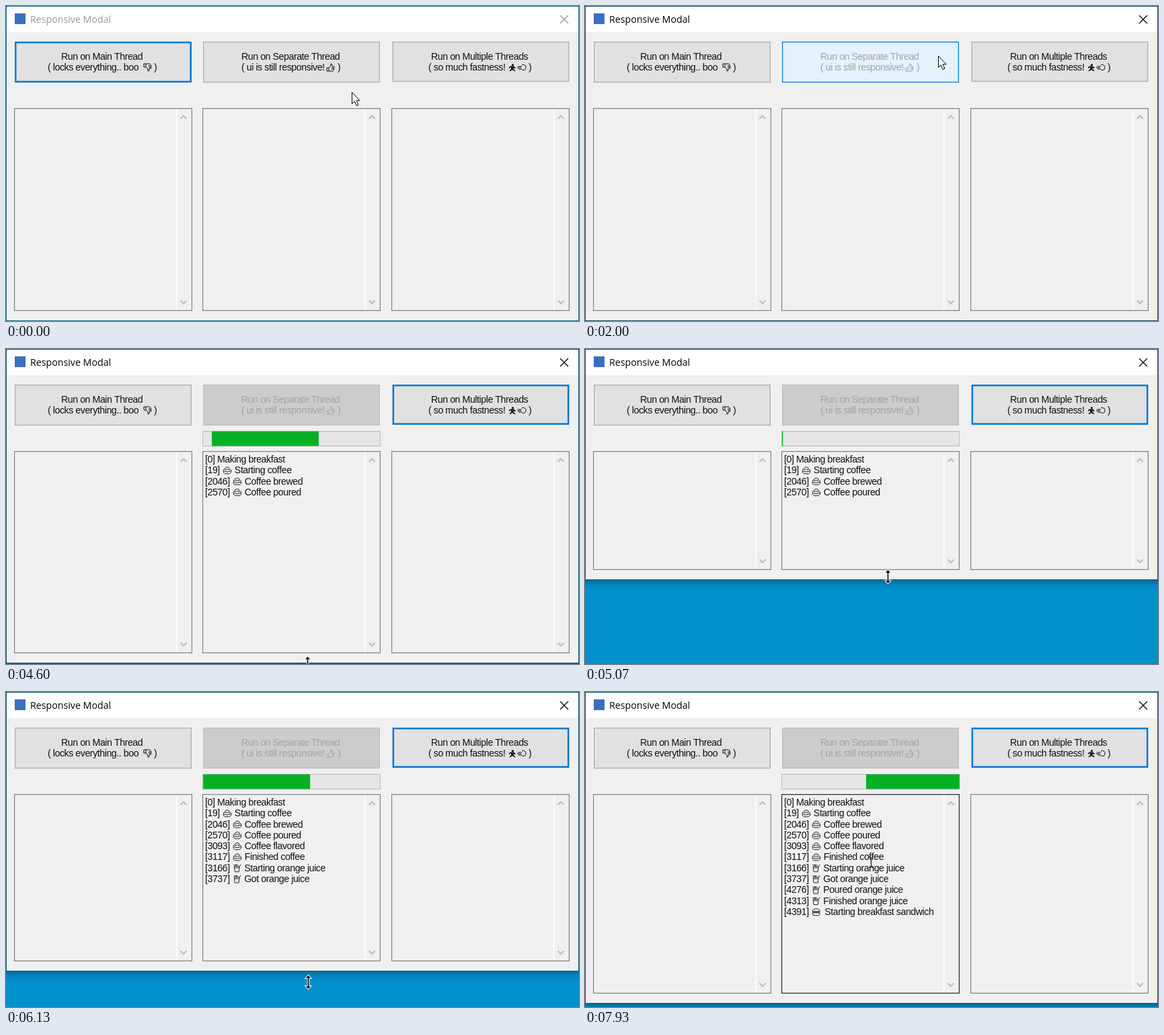
These frames come from a looping animation (852 by 469 pixels, 8000 ms). An HTML page with a canvas:

```html
<!DOCTYPE html>
<html lang="en">
<head>
<meta charset="utf-8">
<title>Responsive Modal</title>
<style>
html, body { margin: 0; width: 100%; height: 100%; overflow: hidden; background: #0391ce; }
canvas { display: block; }
</style>
</head>
<body>
<canvas id="stage" width="852" height="469"></canvas>
<script>
const ctx = document.getElementById('stage').getContext('2d');
const W = 852, H = 469, LOOP = 8000, STEP = 1000 / 15;
const UI_FONT = '14.2px "Liberation Sans", Arial, sans-serif';
const TITLE_FONT = '14.2px "Open Sans", "Noto Sans", sans-serif';

const CLICK = 1866, DISABLED = 1999, LOG_START = 2015;
const DRAG_FROM = 4460, DRAG_TO = 6940;
const BOXES = [12, 292, 573];
const BAR = { x: 293, w: 264, chunk: 159 };
const LAP = BAR.w + BAR.chunk;

// Tracks: [time, value]
const edgeTrack = [[4533, 468], [4600, 467], [5333, 292], [5667, 337], [6133, 415], [6600, 457], [6933, 463]];
const cursorX = [[1133, 514], [1533, 525], [2133, 525], [2667, 506], [3200, 452], [4400, 448], [4600, 448],
  [5667, 453], [6600, 445], [7133, 445], [7933, 425]];
const cursorY = [[1067, 128], [1600, 74], [2133, 74], [2667, 142], [3200, 400], [3533, 420], [4200, 468],
  [4600, 468], [5300, 294], [5667, 359.5], [6133, 432], [6600, 463], [6933, 466], [7133, 466], [7867, 256], [7933, 253]];
const barTrack = [[2067, 134 - LAP], [3200, 418], [4600, 306 + 2 * LAP], [5667, 463 + 3 * LAP],
  [6600, 546 + 4 * LAP], [7933, 418 + 6 * LAP]];

const LOG = [
  [0, '', 'Making breakfast'],
  [19, 'pot', 'Starting coffee'],
  [2046, 'pot', 'Coffee brewed'],
  [2570, 'pot', 'Coffee poured'],
  [3093, 'pot', 'Coffee flavored'],
  [3117, 'pot', 'Finished coffee'],
  [3166, 'cup', 'Starting orange juice'],
  [3737, 'cup', 'Got orange juice'],
  [4276, 'cup', 'Poured orange juice'],
  [4313, 'cup', 'Finished orange juice'],
  [4391, 'bun', 'Starting breakfast sandwich']
];

// Line icons on a 13 x 13 grid
const ICONS = {
  up: 'M1 7H4V12H1ZM4 7L7 4V1Q9 1 9 3V5H11.5Q12.5 6 11.5 7Q12.5 8 11.5 9Q12 10.5 10.5 11Q10.5 12 9 12H4M8 7H11M8 9H11',
  down: 'M1 1H4V6H1ZM4 6L7 9V12Q9 12 9 10V8H11.5Q12.5 7 11.5 6Q12.5 5 11.5 4Q12 2.5 10.5 2Q10.5 1 9 1H4M8 4H11M8 6H11',
  puff: 'M1 5H7M0 7H6M2 9H7M7 3Q9 1 11 3Q14 4 13 7Q13 10 10 10.5Q8 11 7 9',
  pot: 'M1 6.5Q0 10 3 11.5H10Q13.5 10 12.5 6.5Q11.5 4.5 10 4.5Q10 1.5 6.5 1.5Q3.5 1.5 3 4.5Q1 4.5 1 6.5ZM3 6Q6 3.5 10 6M2 8Q6.5 9.5 12 7.5',
  cup: 'M2 4H10L9 12H3ZM1 2H8M10 4L12 1M3 6H9M5 1V4',
  bun: 'M1 6Q1 2 6.5 2Q12 2 12 6ZM1 8H12V10Q11 12 9 12H4Q1 12 1 9ZM1 7H12'
};
const RUNNER = 'M5 1.5H8V4H5ZM3 4.5H8L11 7L10 8L7 7L8 9L11 12H9L6 10L3 12H1L4 9L4 6L1 8V6Z';
const paths = {};
for (const name in ICONS) paths[name] = new Path2D(ICONS[name]);
const runner = new Path2D(RUNNER);
const arrow = new Path2D('M.5 .5V17.5L4.4 13.8L7.2 20.5L9.9 19.3L7.1 12.8H12Z');
const sizer = new Path2D('M.5 -10L4 -6H1.3V6H4L.5 10L-3 6H-.3V-6H-3Z');

const clamp = v => Math.max(0, Math.min(1, v));
const ramp = (t, from, to) => clamp((t - from) / (to - from));

// Smooth curve through the points without overshoot
function track(pts, t) {
  const last = pts.length - 1;
  if (t <= pts[0][0]) return pts[0][1];
  if (t >= pts[last][0]) return pts[last][1];
  let i = 0;
  while (t >= pts[i + 1][0]) i++;
  const slope = k => (pts[k + 1][1] - pts[k][1]) / (pts[k + 1][0] - pts[k][0]);
  const tangent = k => {
    if (k === 0) return slope(0);
    if (k === last) return slope(last - 1);
    const a = slope(k - 1), b = slope(k);
    return a * b <= 0 ? 0 : 2 * a * b / (a + b);
  };
  const [t0, a] = pts[i], [t1, b] = pts[i + 1];
  const d = t1 - t0, u = (t - t0) / d, v = 1 - u;
  return a * (1 + 2 * u) * v * v + b * u * u * (3 - 2 * u) + d * u * v * (tangent(i) * v - tangent(i + 1) * u);
}

function mix(a, b, p) {
  return 'rgb(' + a.map((v, i) => Math.round(v + (b[i] - v) * p)).join(',') + ')';
}

function rect(x, y, w, h, color) {
  ctx.fillStyle = color;
  ctx.fillRect(x, y, w, h);
}

function frame(x, y, w, h, color, line = 1) {
  ctx.strokeStyle = color;
  ctx.lineWidth = line;
  ctx.strokeRect(x + line / 2, y + line / 2, w - line, h - line);
}

function text(str, x, y, color) {
  ctx.font = UI_FONT;
  ctx.letterSpacing = '-0.45px';
  ctx.fillStyle = color;
  ctx.fillText(str, x, y);
  return ctx.measureText(str).width;
}

function polyline(points, color, line) {
  ctx.strokeStyle = color;
  ctx.lineWidth = line;
  ctx.beginPath();
  points.forEach(([x, y]) => ctx.lineTo(x, y));
  ctx.stroke();
}

function icon(name, x, y, color) {
  ctx.save();
  ctx.translate(x, y);
  if (name === 'run') {
    ctx.fillStyle = color;
    ctx.fill(runner);
  } else {
    ctx.strokeStyle = color;
    ctx.lineWidth = 1;
    ctx.stroke(paths[name]);
  }
  ctx.restore();
}

function drawWindow(edge, active) {
  if (edge < H - 1) {
    rect(0, edge, W, H - edge, '#0391ce');
    const shade = ctx.createLinearGradient(0, edge, 0, edge + 16);
    shade.addColorStop(0, 'rgba(0,30,50,.36)');
    shade.addColorStop(.45, 'rgba(0,30,50,.13)');
    shade.addColorStop(1, 'rgba(0,30,50,0)');
    rect(0, edge, W, 16, shade);
  }
  rect(0, 0, W, edge + 1, active ? '#0b506c' : '#1c6f90');
  rect(1, 1, W - 2, 38, '#fff');
  rect(1, 39, W - 2, edge - 39, '#f0f0f0');
  rect(13, 11, 16, 16, '#3c6ebf');

  const ink = active ? '#000' : '#999';
  ctx.font = TITLE_FONT;
  ctx.letterSpacing = '0px';
  ctx.fillStyle = ink;
  ctx.fillText('Responsive Modal', 36, 25);
  polyline([[824, 14], [836, 26]], ink, 1.2);
  polyline([[836, 14], [824, 26]], ink, 1.2);
}

function button(x, w, h, fill, border, line, ink, top, topX, sub, subX, marks, closeX) {
  rect(x, 53, w, h, fill);
  frame(x, 53, w, h, border, line);
  text(top, topX, 80, ink);
  text(sub, subX, 96, ink);
  marks.forEach(([name, ix]) => icon(name, ix, 85, ink));
  text(')', closeX, 96, ink);
}

function drawButtons(t) {
  const focus = ['#0078d7', 2.5], plain = ['#adadad', 1.25];
  const first = t < CLICK ? focus : plain;
  const third = t < DISABLED + 50 ? plain : focus;

  button(13, 263, 61, '#e1e1e1', ...first, '#111', 'Run on Main Thread', 82,
    '( locks everything.. boo', 62, [['down', 204]], 220);

  const hover = ramp(t, 1260, 1530), fade = ramp(t, DISABLED, 2300);
  let fill = mix([225, 225, 225], [229, 241, 251], hover);
  let border = mix([173, 173, 173], [0, 120, 215], hover);
  if (t >= CLICK && t < DISABLED) {
    fill = '#cce4f7';
    border = '#005499';
  } else if (t >= DISABLED) {
    fill = mix([229, 241, 251], [204, 204, 204], fade);
    border = mix([0, 120, 215], [191, 191, 191], fade);
  }
  button(293, 263, 61, fill, border, 1.25, t < DISABLED ? '#111' : '#a4a4a4', 'Run on Separate Thread', 350,
    '( ui is still responsive!', 350, [['up', 476]], 493);

  button(574.6, 262.8, 59.8, '#e1e1e1', ...third, '#111', 'Run on Multiple Threads', 632,
    '( so much fastness!', 628, [['run', 747], ['puff', 760]], 777);
}

function drawProgress(t) {
  if (t < LOG_START) return;
  rect(292, 122, 265, 23, '#e6e6e6');
  const left = BAR.x - BAR.chunk;
  const x = left + (((track(barTrack, t) - left) % LAP) + LAP) % LAP;
  const from = Math.max(BAR.x, x), to = Math.min(BAR.x + BAR.w, x + BAR.chunk);
  frame(292, 122, 265, 23, '#bcbcbc');
  if (to > from) rect(from, 122.6, to - from, 21.8, '#06b025');
}

function chevron(x, y, dir) {
  polyline([[x - 4.5, y + 2.5 * dir], [x, y - 2 * dir], [x + 4.5, y + 2.5 * dir]], '#bfbfbf', 2.2);
}

function drawBox(x, edge, dark) {
  const h = edge - 14 - 152;
  frame(x + 1, 153, 263, h - 2, '#f6f6f6');
  rect(x + 241, 153, 1.5, h - 2, '#fff');
  frame(x, 152, 265, h, dark ? '#262626' : '#7f7f7f', 1.2);
  chevron(x + 252, 165.5, 1);
  chevron(x + 252, edge - 27, -1);
}

function drawLog(t, edge) {
  ctx.save();
  ctx.beginPath();
  ctx.rect(293, 153, 240, edge - 168);
  ctx.clip();
  LOG.forEach(([at, mark, label], i) => {
    if (t < LOG_START + at) return;
    const y = 169 + i * 16.28;
    const end = 296 + text('[' + at + ']', 296, y, '#111');
    if (mark) icon(mark, end + 4.5, y - 11, '#222');
    const gap = { pot: 22, cup: 21.5, bun: 23.5 }[mark] || 3.5;
    text(label, end + gap, y, '#111');
  });
  ctx.restore();
}

function drawCursor(x, y, kind) {
  ctx.save();
  ctx.translate(x, y);
  if (kind === 'text') {
    polyline([[-3, -7.5], [-1, -7.5], [.5, -6.5], [2, -7.5], [4, -7.5]], '#111', 1);
    polyline([[.5, -7], [.5, 8]], '#111', 1.2);
    polyline([[-3, 8.5], [-1, 8.5], [.5, 7.5], [2, 8.5], [4, 8.5]], '#111', 1);
  } else if (kind === 'size') {
    ctx.strokeStyle = '#fff';
    ctx.lineWidth = 2;
    ctx.stroke(sizer);
    ctx.fillStyle = '#000';
    ctx.fill(sizer);
  } else {
    ctx.fillStyle = '#fff';
    ctx.fill(arrow);
    ctx.strokeStyle = '#000';
    ctx.lineWidth = 1;
    ctx.stroke(arrow);
  }
  ctx.restore();
}

function draw(t) {
  const edge = Math.round(track(edgeTrack, t));
  const x = Math.round(track(cursorX, t)), y = Math.round(track(cursorY, t));
  const dragging = t > DRAG_FROM && t < DRAG_TO;
  const inBox = !dragging && y > 152 && y < edge - 14;
  const kind = dragging || y > edge - 6 ? 'size' : inBox ? 'text' : 'arrow';

  drawWindow(edge, t >= CLICK);
  drawButtons(t);
  drawProgress(t);
  BOXES.forEach((bx, i) => drawBox(bx, edge, i === 1 && inBox));
  drawLog(t, edge);
  drawCursor(x, y, kind);
}

ctx.fontKerning = 'none';
const start = performance.now();
function tick() {
  const t = (performance.now() - start) % LOOP;
  draw(Math.floor((t + 4) / STEP) * STEP);
  requestAnimationFrame(tick);
}
tick();
</script>
</body>
</html>
```
